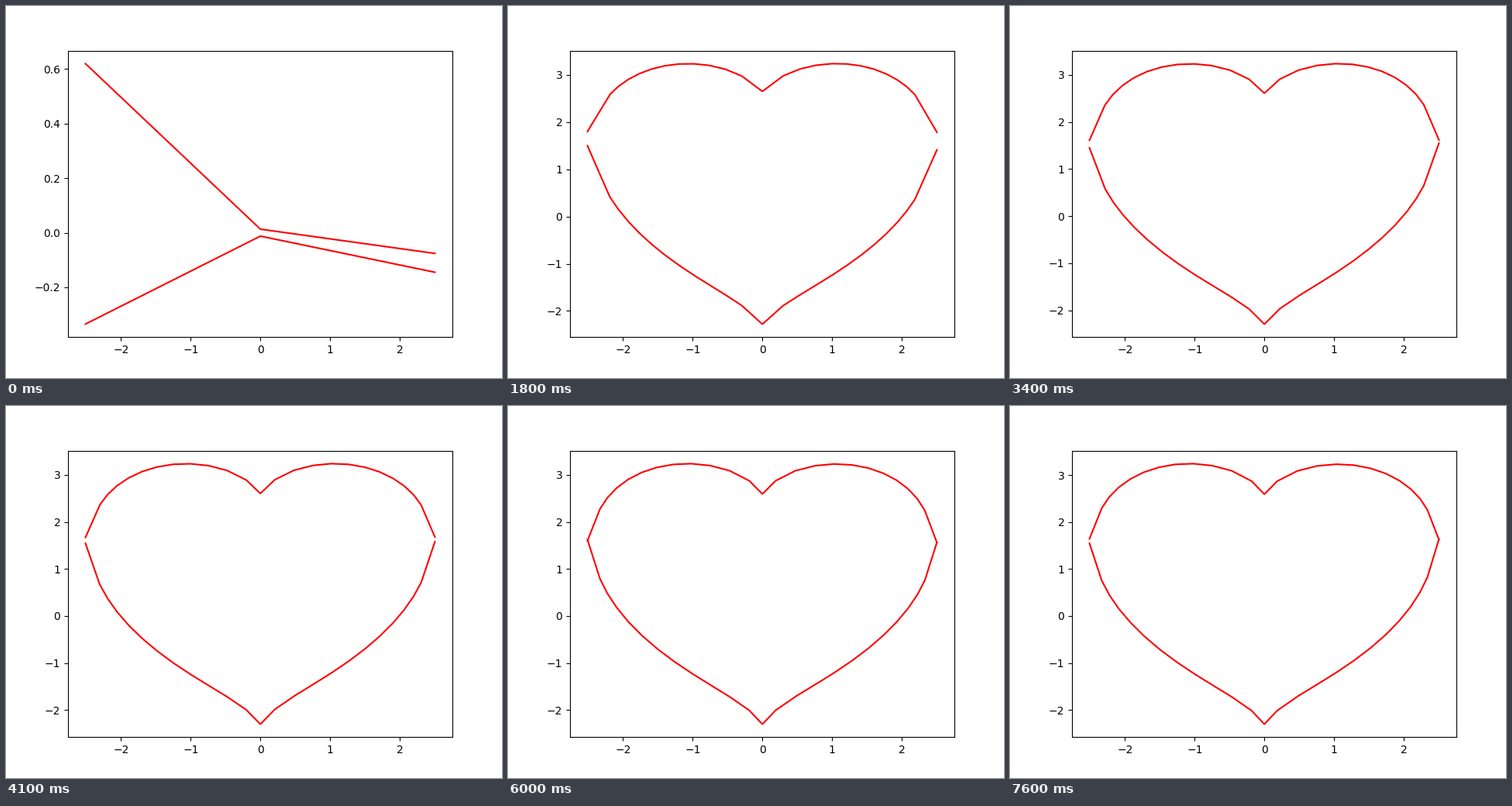
These frames come from a looping animation (640x480 px, 7.7 s). A matplotlib script:

```python
import numpy as np
import matplotlib.pyplot as plt
from matplotlib.animation import FuncAnimation

FRAMES, STEP = 77, 100
LEFT, RIGHT = -2.51, 2.505
X = np.linspace(LEFT, RIGHT, 601)
rng = np.random.default_rng(4)
wobble = rng.normal(size=(FRAMES, 2, 3))


def heart(x, sign):
    """Branch of x^2 + (y - sqrt|x|)^2 = 6."""
    return np.sqrt(np.abs(x)) + sign * np.sqrt(6 - x**2)


def learned(n, sign):
    """Faceted heart with straight cusps and ends that sharpen over time."""
    lag = np.exp((10 - n) / 15)
    knee = 2.34 - .26 * lag
    notch = .18 + .2 * lag
    end = 1.605 + sign * .3 * lag
    tip = 2.59 + .1 * lag if sign > 0 else -2.305 + .04 * lag
    # equal turns of the circle put more facets where the curve is steep
    turns = np.linspace(*np.arcsin(np.array([notch, knee]) / 6**.5), 11)
    x = 6**.5 * np.sin(turns)
    y = heart(x, sign)
    return np.interp(X, np.r_[LEFT, -x[::-1], 0, x, RIGHT],
                     np.r_[end, y[::-1], tip, y, end])


def noise(n, sign):
    """Stochastic training: a slight tilt, loose at both ends."""
    tilt, left, right = wobble[n, int(sign > 0)]
    side = np.where(X < 0, left, right)
    return .015 * tilt * X / RIGHT + .035 * side * (np.abs(X) / RIGHT) ** 8


def curve(n, sign, start):
    guess = np.interp(X, (LEFT, 0, RIGHT), start)
    fit = 1 - np.exp(-.7 * n)
    return guess + fit * (learned(n, sign) + noise(n, sign) - guess)


def curves(n):
    return (curve(n, 1, (.620, .013, -.076)),
            curve(n, -1, (-.335, -.0125, -.145)))


fig, ax = plt.subplots(figsize=(6.4, 4.8), dpi=100)
lines = [ax.plot(X, y, "r")[0] for y in curves(0)]


def update(n):
    for line, y in zip(lines, curves(n)):
        line.set_data(X, y)
    ax.relim()
    ax.autoscale_view()
    return lines


anim = FuncAnimation(fig, update, frames=FRAMES, interval=STEP,
                     repeat=True, repeat_delay=0)
plt.show()
```
